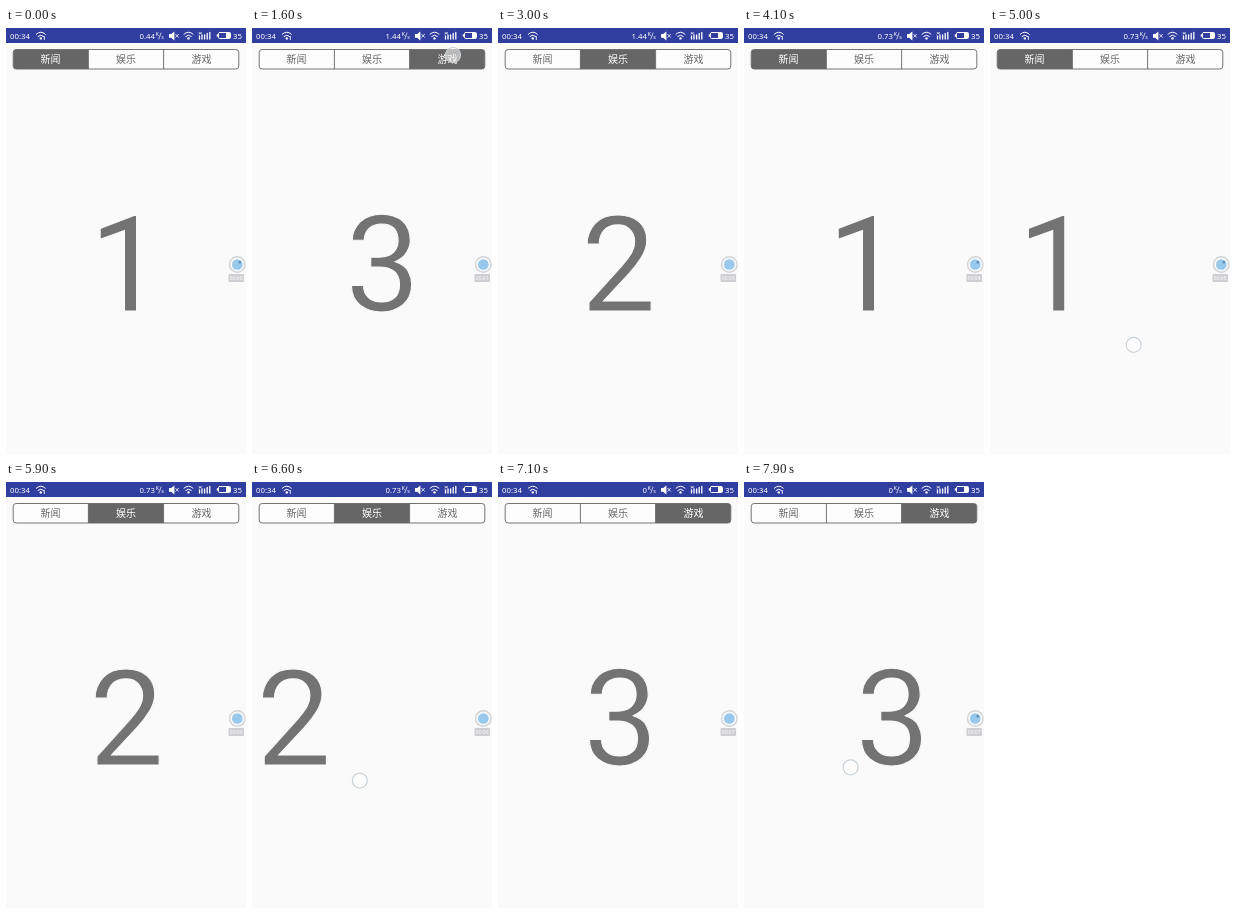
These frames come from a looping animation (240 px wide and 426 px high, 8000 ms). An HTML page:

```html
<!DOCTYPE html>
<html lang="zh-CN">
<head>
<meta charset="utf-8">
<style>
  html, body { margin: 0; width: 100%; height: 100%; overflow: hidden; background: #fafafa; }
  svg { display: block; width: 100%; height: 100%; }
  text { font-family: "Noto Sans", sans-serif; }
  .bar text { font-size: 7.8px; font-weight: 500; fill: #fff; }
  .bar .unit { font-size: 5.6px; }
  .tab text { font: 300 10px "Noto Sans CJK SC", "Noto Sans CJK", sans-serif; text-anchor: middle; }
  /* the background-coloured outline slims the digits */
  .page { font: 133.6px Roboto, sans-serif; fill: #737373; stroke: #fafafa; stroke-width: 1.1; text-anchor: middle; }
  .line { fill: none; stroke: #fff; stroke-linecap: round; }
</style>
</head>
<body>
<svg viewBox="0 0 240 426">
  <defs>
    <clipPath id="round"><rect x="7.2" y="21.5" width="225.6" height="19.5" rx="3"/></clipPath>
    <g id="wifi" class="line">
      <path d="M-4.5-1.8Q0-6 4.5-1.8M-2.8.4Q0-2.2 2.8.4"/>
      <circle cy="2.4" r="1.2" fill="#fff" stroke="none"/>
    </g>
  </defs>
  <rect width="240" height="426" fill="#fafafa"/>
  <g id="pages"></g>
  <g class="bar">
    <rect width="240" height="15" fill="#303f9f"/>
    <text x="4" y="10.6">00:34</text>
    <use href="#wifi" x="34.8" y="8"/>
    <path class="line" d="M38.3 8.5v3" stroke-width=".9"/>
    <text id="speed" x="149" y="10.6" text-anchor="end"></text>
    <text class="unit" x="149.4" y="8.4">K</text>
    <path class="line" d="M152.8 11l2.2-6" stroke-width=".7"/>
    <text class="unit" x="155.2" y="11">s</text>
    <path d="M163 6h2.2l3.2-2.6v9l-3.2-2.6H163z" fill="#fff"/>
    <path class="line" d="M169.7 6.3l2.8 3m0-3l-2.8 3" stroke-width=".8"/>
    <use href="#wifi" x="182.5" y="8"/>
    <path class="line" d="M193.5 11V8M196 11V7M198.6 11V7M201.2 11V5.5M203.8 11V4.5" stroke-width="1.3" stroke-linecap="butt"/>
    <path class="line" d="M193 4.5l2.5 1.5m0-1.5L193 6" stroke-width=".7"/>
    <rect class="line" x="212.5" y="4.5" width="12" height="6" rx="1"/>
    <path d="M210.8 6.2h1.7v2.6h-1.7zM220 5h4v5h-4z" fill="#fff"/>
    <text x="227" y="10.6">35</text>
  </g>
  <g id="tabs" clip-path="url(#round)"></g>
  <g fill="none" stroke="#666" stroke-width=".9">
    <rect x="7.2" y="21.5" width="225.6" height="19.5" rx="3"/>
    <path d="M82.4 21.5V41M157.6 21.5V41"/>
  </g>
  <circle cx="231.3" cy="236.5" r="7.8" fill="#f6f7f8" stroke="#d2d5d8" stroke-width="1.4"/>
  <circle cx="231.3" cy="236.5" r="5.3" fill="#98c8ec"/>
  <circle id="lens" cx="233.8" cy="234.3" r="1.2" fill="#5f86ad"/>
  <rect x="222.5" y="246" width="15.5" height="8" rx="1" fill="#cfcfd3"/>
  <text id="timer" x="230.2" y="252" font-size="5" fill="#fff" text-anchor="middle"></text>
  <circle id="touch" r="7.5" fill="#fff" fill-opacity=".55" stroke="#cad2d7" stroke-width="1.2"/>
</svg>
<script>
const LOOP = 8000, W = 240, SLOP = 10;
const $ = id => document.getElementById(id);
const clamp = v => Math.min(1, Math.max(0, v));
const swing = u => (1 - Math.cos(Math.PI * u)) / 2;
const settle = u => 1 - (1 - clamp(u)) ** 5;
const mix = (a, b, k) => a + (b - a) * k;

const taps = [
  { at: 700, x: 120, y: 28, from: 0, to: 1 },
  { at: 1600, x: 201, y: 27, from: 1, to: 2 },
  { at: 2600, x: 120, y: 28, from: 2, to: 1 },
  { at: 3700, x: 45, y: 28, from: 1, to: 0 }
];
const drags = [
  { at: 4700, end: 5500, x: 209.5, dx: -212, y: u => 318.5 - 5.2 * u, from: 0, to: 1 },
  { at: 6400, end: 6800, x: 196.5, dx: -176, y: u => 287.3 - 20 * u + 84 * u * u, from: 1, to: 2 },
  { at: 7700, end: 8200, x: 68.3, dx: 110, y: u => 292.3 - 20 * u, from: 2, to: 1 }
];

$("pages").innerHTML = [1, 2, 3].map((n, i) =>
  `<text class="page" x="${W * i + 120.5}" y="282.5">${n}</text>`).join("");
$("tabs").innerHTML = ["新闻", "娱乐", "游戏"].map((name, i) =>
  `<g class="tab"><rect x="${7.2 + i * 75.2}" y="21.5" width="75.2" height="19.5"/>
   <text x="${44.6 + i * 75.4}" y="35.3">${name}</text></g>`).join("");

function tapState(t, g) {
  // the slide is already well under way when the tap shows
  const k = settle((t - g.at + 280) / 600);
  return { scroll: W * mix(g.from, g.to, k), tab: g.to, x: g.x, y: g.y, alpha: clamp(1 - (t - g.at) / 400) };
}

function dragState(t, g) {
  const u = swing(clamp((t - g.at) / (g.end - g.at)));
  const x = g.x + g.dx * u, held = t < g.end;
  const pull = Math.max(0, Math.abs(x - g.x) - SLOP) * -Math.sign(g.dx);
  const k = held ? 0 : settle((t - g.end) / 600);
  return {
    scroll: mix(W * g.from + pull, W * g.to, k),
    tab: held ? g.from : g.to,
    x, y: g.y(u), alpha: clamp(1 - (t - g.end) / 300)
  };
}

function stateAt(t) {
  const drag = drags.findLast(g => t >= g.at);
  if (drag) return dragState(t, drag);
  const tap = taps.findLast(g => t >= g.at);
  return tap ? tapState(t, tap) : { scroll: 0, tab: 0, x: 0, y: 0, alpha: 0 };
}

function draw(t) {
  const s = stateAt(t);
  $("pages").setAttribute("transform", `translate(${-s.scroll})`);
  [...$("tabs").children].forEach((tab, i) => {
    const on = i === s.tab;
    tab.firstElementChild.setAttribute("fill", on ? "#666" : "#fdfdfd");
    tab.lastElementChild.setAttribute("fill", on ? "#fff" : "#666");
  });
  $("touch").setAttribute("transform", `translate(${s.x} ${s.y})`);
  $("touch").setAttribute("opacity", s.alpha);
  $("speed").textContent = t < 100 ? "0.44" : t < 3500 ? "1.44" : t < 6900 ? "0.73" : "0";
  $("timer").textContent = "00:0" + Math.floor(t / 1000);
  $("lens").setAttribute("opacity", Math.floor((t + 500) / 2000) % 2 ? 0 : 1);
}

const start = performance.now();
function tick() {
  draw((performance.now() - start) % LOOP);
  requestAnimationFrame(tick);
}
tick();
</script>
</body>
</html>
```
